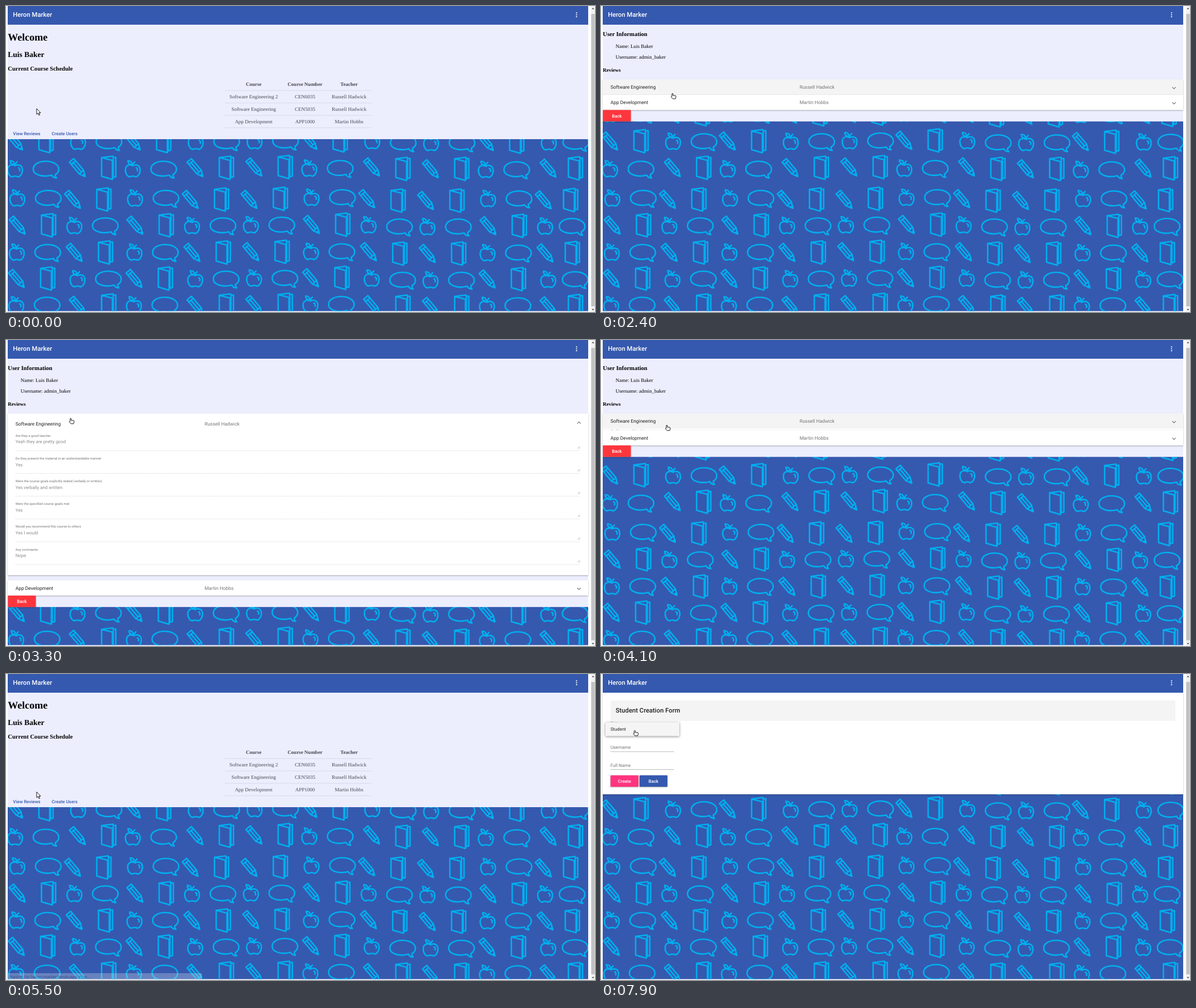
Animation of 1038 by 540 pixels, one loop 8 s. Source, as an HTML page:

```html
<!DOCTYPE html>
<html lang="en">
<head>
<meta charset="utf-8">
<title>Course reviews</title>
<style>
  html, body { margin: 0; width: 100%; height: 100%; overflow: hidden; background: #fff; }
  #stage { display: block; width: 1038px; height: 540px; }
  text { white-space: pre; text-rendering: geometricPrecision; }
  .serif { font-family: "Liberation Serif", "Times New Roman", serif; }
  .sans { font-family: Roboto, sans-serif; }
  .icon { fill: none; stroke: #00aeef; stroke-width: 2.6; stroke-linejoin: round; stroke-linecap: round; }
  .card { filter: drop-shadow(0 1px 1px rgba(0, 0, 0, .3)); }
  .cursor { fill: #fff; stroke: #000; stroke-width: .9; stroke-linejoin: round; }
</style>
</head>
<body>
<svg id="stage" viewBox="0 0 1038 540">
  <defs>
    <clipPath id="page"><rect x="3" y="33" width="1023" height="505.5"/></clipPath>
    <g id="apple">
      <path d="M0-5C-5-8-13-7-13 2.500C-13 9-8 16-4 14Q0 12.500 4 14C8 16 13 9 13 2.500C13-7 5-8 0-5Z"/>
      <path d="M-1-7C-6-7-8.500-9.500-8.500-14C-4-14-1-12-1-7M0-6Q0-9 3.500-12M6-1.500Q9-.5 8 4"/>
    </g>
    <path id="bubble" d="M10 9.500C-8 14-22.500 8-22.500-1C-22.500-10-12-15-.5-15C13-15 22.500-9 22.500-1C22.500 4 20 6.500 16.500 8.500Q16 12 18.500 14.500Q13 14.500 10 9.500Z"/>
    <g id="pencil" transform="rotate(50)">
      <path d="M-17-5H10L20 0L10 5H-17ZM-12-5V5M-12 0H10M10-5V5"/>
      <path d="M16-2L20 0L16 2Z"/>
    </g>
    <path id="book" d="M-12.500-18L6.500-13V20.500L-12.500 15ZM-12.500-18L7.500-20.500L8-18V17.500L6.500 18M8-18L12.500-18.500V16L8 17"/>
  </defs>
  <rect x="3" width="1023" height="538.500" fill="#3559ae"/>
  <g id="pattern" class="icon" clip-path="url(#page)"></g>
  <g id="scene"></g>
  <g id="chrome"></g>
  <g id="overlay"></g>
</svg>
<script>
const $ = id => document.getElementById(id);
const BLUE = '#3559ae', RED = '#fd363d', PINK = '#ff357f', DARK = '#212121', GREY = '#757575', PALE = '#eceefe';
const APP = 'Heron Marker', STUDENT = 'Luis Baker', LOGIN = 'admin_baker';
const TEACHER = 'Russell Hadwick', TUTOR = 'Martin Hobbs';
const QA = [
  ['Are they a good teacher', 'Yeah they are pretty good'],
  ['Do they present the material in an understandable manner', 'Yes'],
  ['Were the course goals explicitly stated (verbally or written)', 'Yes verbally and written'],
  ['Were the specified course goals met', 'Yes'],
  ['Would you recommend this course to others', 'Yes I would'],
  ['Any comments', 'Nope']
];

// --- drawing helpers
const rect = (x, y, w, h, fill, more = '') =>
  `<rect x="${x}" y="${y}" width="${w}" height="${h}" fill="${fill}" ${more}/>`;
const line = (x, y, x2, color, more = '') =>
  `<path d="M${x} ${y}H${x2}" stroke="${color}" stroke-width=".6" ${more}/>`;
const text = (cls, x, y, size, str, fill = '#000', weight = 400, anchor = 'start') =>
  `<text class="${cls}" x="${x}" y="${y}" font-size="${size}" fill="${fill}" font-weight="${weight}" text-anchor="${anchor}">${str}</text>`;
const serif = (...a) => text('serif', ...a);
const sans = (...a) => text('sans', ...a);
const button = (x, y, label, fill) =>
  rect(x, y, 49.3, 20.2, fill, 'rx="1" class="card"') + sans(x + 24.7, y + 13, 7.88, label, '#fff', 500, 'middle');
const chevron = (y, turn) =>
  `<path d="M-3-1.500L0 1.500L3-1.500" transform="translate(1009.800 ${y}) rotate(${turn})" fill="none" stroke="${GREY}" stroke-width="1.200"/>`;

// --- time helpers
const clamp = v => Math.max(0, Math.min(1, v));
const within = (t, ...spans) => spans.some(([a, b]) => t >= a && t < b);
const smooth = v => v * v * (3 - 2 * v);

// cubic-bezier(.4, 0, .2, 1)
function standardEase(x) {
  let lo = 0, hi = 1, s = x;
  for (let i = 0; i < 24; i++) {
    s = (lo + hi) / 2;
    const px = 1.2 * (1 - s) ** 2 * s + .6 * (1 - s) * s * s + s ** 3;
    if (px < x) lo = s; else hi = s;
  }
  return 3 * (1 - s) * s * s + s ** 3;
}

// --- wallpaper: each row has a left pair and a right pair, strung along ten strips
const AB = ['apple', 'bubble'], PK = ['pencil', 'book'];
const ROWS = [
  [AB, 16, 96, 118, 97], [PK, 17, 143.5, 123, 143], [AB, 16, 190, 124, 191],
  [PK, 16, 238.5, 127, 238.5], [AB, 16, 287, 126.5, 285.5], [AB, 20, 338.5, 118, 341.5],
  [PK, 20.5, 387, 120.5, 387], [AB, 19, 434, 121, 435], [PK, 19, 481, 126, 481],
  [AB, 18, 527, 126.5, 528.5]
];
function wallpaper() {
  let out = '';
  for (const [first, xl, yl, xr, yr] of ROWS) {
    [...'LRLRRLRRLR'].forEach((side, k) => {
      const left = side === 'L';
      const pair = left ? first : first === AB ? PK : AB;
      pair.forEach((kind, i) => {
        let x = (left ? xl : xr - 103.7) + k * 103.7 + i * 54.5;
        if (k === 9) x -= 7 * i;
        const shift = x < 430 ? 0 : x < 661 ? -1.2 : x < 830 ? 2 : 1;
        const y = (left ? yl : yr) + shift + (kind === 'bubble' ? 2 : 0);
        out += `<use href="#${kind}" transform="translate(${x.toFixed(1)} ${y})"/>`;
      });
    });
  }
  return out;
}

function frameParts() {
  let out = rect(3, 0, 1023, 33, BLUE) + sans(12.3, 19, 11.25, APP, '#fff', 500);
  for (const y of [12.1, 15.5, 18.9]) out += `<circle cx="1005.500" cy="${y}" r="1.100" fill="#fff"/>`;
  return out + rect(1031, 0, 7, 540, '#f1f1f1') + rect(1031.3, 14, 6.2, 516, '#c1c1c1') +
    '<path d="M1032.500 5.500l2-2.500l2 2.500zM1032.500 534.800l2 2.500l2-2.500z" fill="#444"/>';
}

// --- pages
function home(t) {
  const loaded = !within(t, [5000, 5400]);
  const up = loaded ? 0 : 26.8, base = loaded ? 235 : 142.5;
  const rows = loaded ? [
    ['Software Engineering 2', 'CEN6035', TEACHER],
    ['Software Engineering', 'CEN5035', TEACHER],
    ['App Development', 'APP1000', TUTOR]
  ] : [];
  let out = rect(3, 33, 1023, base - 33, PALE) + serif(3.3, 61, 18, 'Welcome', '#000', 700);
  if (loaded) out += serif(3.3, 90, 13.5, STUDENT, '#000', 700);
  out += serif(3.3, 114 - up, 10.53, 'Current Course Schedule', '#000', 700);
  [['Course', 'Course Number', 'Teacher'], ...rows].forEach((cells, r) => {
    const y = 141 - up + r * 21.85;
    cells.forEach((c, i) => {
      out += serif([436.5, 527, 604.7][i], y, 9, c, '#484850', r ? 400 : 700, 'middle');
    });
    out += line(385.5, y + 8.2, 644, '#c8c9d6');
  });
  if (within(t, [300, 1300])) out += rect(3.3, base - 20.2, 66, 20.2, BLUE, 'opacity=".12" rx="1"');
  if (within(t, [5900, 6200])) out += rect(71.5, base - 20.2, 63.5, 20.2, BLUE, 'opacity=".12" rx="1"');
  return out + sans(12.3, base - 7.2, 7.88, 'View Reviews', BLUE, 500) +
    sans(80.6, base - 7.2, 7.88, 'Create Users', BLUE, 500);
}

function answers() {
  return QA.map(([q, a], i) => {
    const y = i * 40.2;
    return sans(13.7, y + 5, 5.9, q, GREY) + sans(13.7, y + 16.8, 7.88, a, '#8c8c8c') +
      line(13.7, y + 29.7, 1009, '#999', 'stroke-dasharray=".6 1.200"') +
      `<path d="M1004.500 ${y + 26}l4-4M1007 ${y + 26}l1.500-1.500" stroke="#777" stroke-width=".6"/>`;
  }).join('');
}

function reviews(t) {
  if (t < 1600) {
    return rect(3, 33, 1023, 54.2, PALE) + serif(3.3, 52.5, 9, 'Reviews', '#000', 700) + button(3.3, 67, 'Back', RED);
  }
  const open = standardEase(clamp((t - 2980) / 225)) - standardEase(clamp((t - 3904) / 225));
  const top = 129.5, head = 27 + 9 * open, body = 249.5 * open;
  const next = top + head + body + 9 * open, end = next + 27;
  const hover = within(t, [2100, 3000], [3900, 4300]);
  const title = (y, course, who) => sans(16.7, y + 3, 8.44, course, DARK) + sans(350, y + 3, 8.44, who, GREY);
  const mid = top + head / 2;
  return rect(3, 33, 1023, end - 12.8, PALE) +
    serif(3.3, 53.3, 10.53, 'User Information', '#000', 700) +
    serif(25.8, 74, 9, 'Name: ' + STUDENT) + serif(25.8, 93, 9, 'Username: ' + LOGIN) +
    serif(3.3, 115.5, 9, 'Reviews', '#000', 700) +
    rect(3, top, 1023, head + body, '#fff', 'class="card"') +
    (hover ? rect(3, top, 1023, head, '#f4f4f4') : '') +
    title(mid, 'Software Engineering', TEACHER) + chevron(mid + 1.7 - 3 * open, 180 * open) +
    `<svg x="3" y="${top + head}" width="1023" height="${body}">${answers()}</svg>` +
    rect(3, next, 1023, 27, '#fff', 'class="card"') +
    title(next + 13.5, 'App Development', TUTOR) + chevron(next + 15, 0) +
    button(3.3, end, 'Back', RED);
}

function form(t) {
  const open = clamp((t - 7340) / 120);
  const field = (y, label) => sans(16.7, y, 7.88, label, GREY) + line(16.7, y + 4.8, 128.7, '#8a8a8a');
  let out = rect(3, 33, 1023, 179.3, '#fff', 'class="card"') + rect(16.7, 46.8, 995.5, 35.8, '#f4f4f4') +
    sans(25.8, 68.4, 11.25, 'Student Creation Form', DARK, 500) +
    field(132.2, 'Username') + field(163.8, 'Full Name') +
    button(16.7, 178.8, 'Create', PINK) + button(67.8, 178.8, 'Back', BLUE);
  if (!open) return out + field(100.7, 'User') + `<path d="M122.500 97h5.600l-2.800 2.800z" fill="${GREY}"/>`;
  return out + sans(16.7, 100.7 - 12.9 * open, 7.88 - 1.98 * open, 'User', BLUE) +
    `<g opacity="${open}" transform="translate(0 85.300) scale(1 ${.8 + .2 * open})">` +
    rect(7.7, 0, 130.3, 24.3, '#f5f5f5', 'rx="1" style="filter:drop-shadow(0 1.500px 2px rgba(0,0,0,.45))"') +
    sans(16.7, 15, 7.88, 'Student', DARK) + '</g>';
}

// --- pointer and status bubble
const PATH = [
  [0, 54, 181], [400, 39.5, 230.5], [1500, 39.5, 230.5], [2400, 125, 154], [2800, 113, 138],
  [3300, 113, 138], [3600, 115, 150], [4200, 115, 150], [4700, 46, 199], [4800, 45, 199],
  [5300, 45, 199], [5500, 54, 208], [6000, 103, 222], [6500, 103, 222], [7200, 58.5, 99.2], [8000, 58.5, 99.2]
];
const SHAPES = {
  arrow: 'M0 0V10.200L2.400 8.100L4 11.800L5.600 11.100L4.100 7.500H7Z',
  hand: 'M0 1Q1-.500 2 1V4H5.800Q7 4 7 5.500V7L6 9.800H1.500L-1.500 6.500Q-1.200 5 0 5.800Z'
};
function pointer(t) {
  const i = PATH.findIndex(p => p[0] > t);
  const [t0, x0, y0] = PATH[i - 1], [t1, x1, y1] = PATH[i];
  const u = smooth((t - t0) / (t1 - t0));
  const hand = within(t, [300, 1300], [2100, 4300], [4800, 5000], [5900, 6200], [7100, 8000]);
  return `<path class="cursor" d="${SHAPES[hand ? 'hand' : 'arrow']}" transform="translate(${x0 + (x1 - x0) * u} ${y0 + (y1 - y0) * u})"/>`;
}
function status(t) {
  const span = [[1400, 1760], [5100, 5560], [6300, 6760]].find(s => within(t, s));
  if (!span) return '';
  return `<g opacity="${clamp((span[1] - t) / 200)}">` + rect(0, 528, 345, 12, '#dfe1e6') +
    sans(5, 536.7, 7.6, 'Waiting for heron-marker.herokuapp.com...', '#444') + '</g>';
}

function draw(t) {
  const page = within(t, [1300, 5000]) ? reviews : t >= 6200 ? form : home;
  $('scene').innerHTML = page(t);
  $('overlay').innerHTML = status(t) + pointer(t);
}

$('pattern').innerHTML = wallpaper();
$('chrome').innerHTML = frameParts();

// the screen advances ten times a second
const STEP = 100, LOOP = 8000;
let start, shown = -1;
function tick(now) {
  start ??= now;
  const t = Math.floor((now - start) % LOOP / STEP) * STEP;
  if (t !== shown) draw(shown = t);
  requestAnimationFrame(tick);
}
draw(0);
requestAnimationFrame(tick);
</script>
</body>
</html>
```
